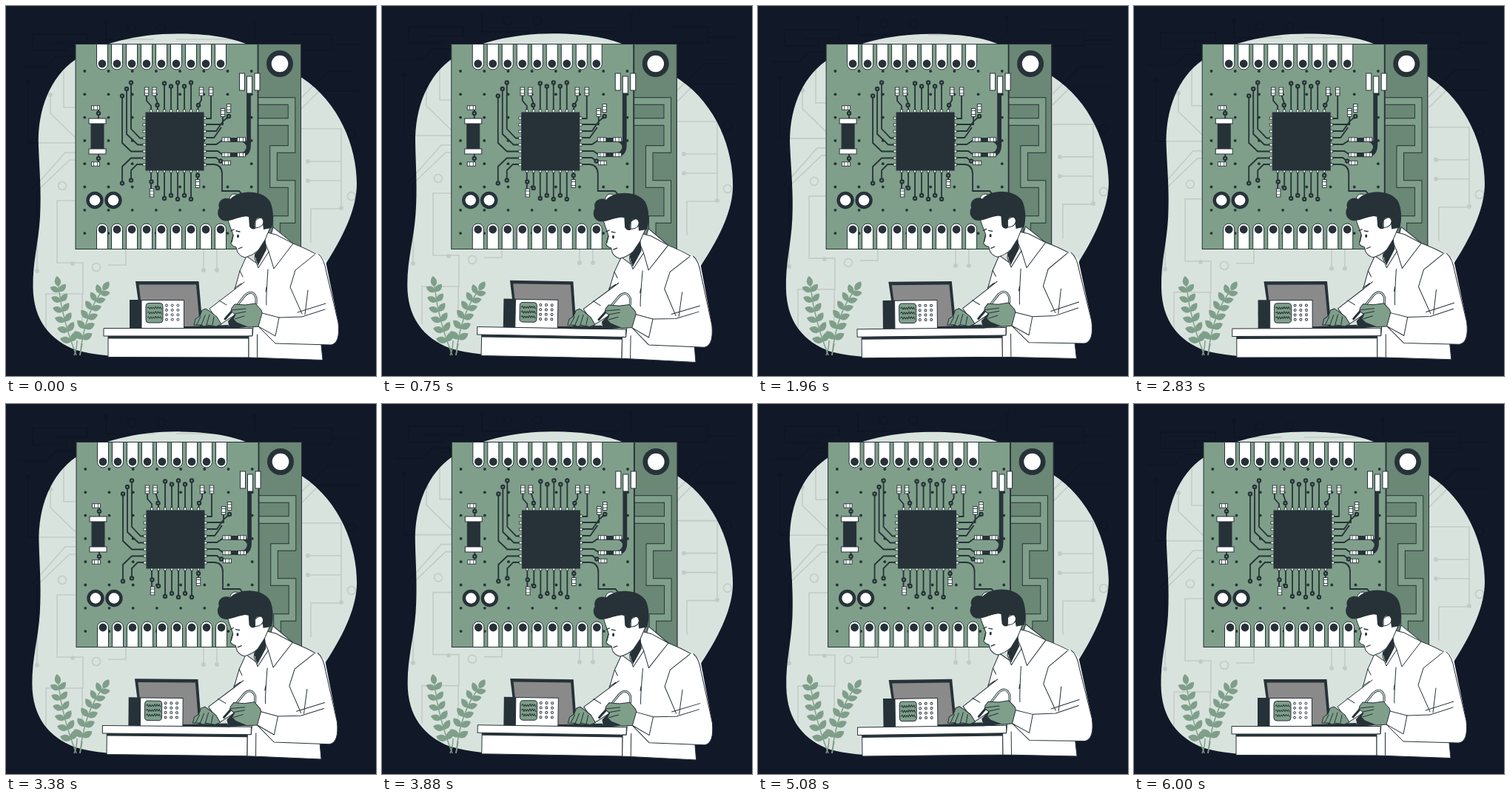
Recreate the animation shown at these times as an HTML page. Size 500 by 500 pixels, loop 6.04 s.

```html
<!DOCTYPE html>
<html lang="en">
<head>
<meta charset="utf-8">
<title>Circuit board workshop</title>
<style>
  html, body { margin: 0; width: 100%; height: 100%; overflow: hidden; background: #111827; }
  svg { display: block; width: 100vw; height: 100vh; }
  .line { fill: none; stroke: #263238; stroke-linecap: round; stroke-linejoin: round; }
  .ink { fill: #263238; }
  .shape { stroke: #263238; stroke-width: 1; stroke-linejoin: round; }
  .white { fill: #fff; }
  .green { fill: #7f9f8a; }
</style>
</head>
<body>
<svg viewBox="0 0 500 500" xmlns="http://www.w3.org/2000/svg">
  <path id="blob" fill="#d9e3de" d="M235 37.5C180 37 125 50 93 73C60 96 42 140 44 190C45 220 48 250 46 285C44 320 36 345 36.5 380C37 425 60 452 95 465C130 475 180 476 230 472C330 465 410 400 433 347C460 305 474 270 474 240C474 190 450 130 400 97C350 65 330 38 235 37.5Z"/>

  <g id="circuit" fill="none" stroke="#000" stroke-width="1.6" opacity=".1"></g>
  <g id="board"></g>
  <g id="plants" class="green"></g>

  <g id="worker">
    <!-- laptop and meter -->
    <path class="ink" d="M175 372H260.500L266 436H184Z"/>
    <path fill="#8a8a8a" d="M179.500 376.500H257L262 433H186Z"/>
    <path class="ink" d="M167 397H184V436H167Z"/>
    <path class="shape white" d="M183 397.500H240.500V436H183Z"/>
    <rect class="shape green" x="189" y="401.500" width="23" height="26.500" rx="4" stroke-width="1.4"/>
    <g id="meter"></g>

    <!-- table -->
    <path class="shape white" d="M138 446H328V475L138 474.500Z"/>
    <path class="ink" d="M138 446H328V449.500H138Z"/>
    <path class="shape white" d="M132 435.500H333V446H132Z"/>

    <!-- shirt -->
    <path class="shape white" d="M325 338L316 358L309 383L275 409L290 430L318 412L334 434L333 446H328V475L428 478.500L426 458L432 400L430 345Q424 335 388 321L361 299L355 320L342 350Z"/>
    <path class="line" d="M339.500 444V475M354 356Q351 400 352 404M309 383L322 373M316 358L320 366M318 375L309 381M288 398L298 404M352 380L351 386"/>
    <path class="ink" d="M300 426L322 403L327 434L302 436Z"/>
    <path class="ink" d="M246 433L300 431L304 436H246Z"/>

    <!-- gloves and tool -->
    <path class="shape green" d="M254 431L256 423L262 419L265 411L270 409L276 413L285 420L291 430L284 433L272 431L268 433L263 431Z"/>
    <path class="line" d="M264 431L269 418M271 431L275 417M279 431L281 420M258 430L263 420"/>
    <path class="line" d="M296 423L311 406L323 391Q333 382 338 394V402" stroke-width="3"/>
    <path class="line" d="M311 406L323 391Q333 382 338 394V402" style="stroke:#d9e3de" stroke-width="1.300"/>
    <path class="shape green" d="M305 408L309 403L323 404L337 402L345 411L347 417L344 433L327 434L312 428L307 423L310 417L304 412Z"/>
    <path class="line" d="M305 411L324 409M309 416L324 413M309 423L322 419"/>

    <!-- near arm -->
    <path class="white" d="M422 334L432 345L449 428Q452 456 439 458L364 456L341 433L346 415L369 421L398 419L384 368L390 346Z"/>
    <path class="line" d="M422 335Q430 341 433 360L449 428Q452 456 439 458L364 456L341 433L346 415L369 421L400 420L431 410M394 414L432 402M408 384L404 417M400 416L384 380L391 357L417 336M369 421L364 446L341 433"/>

    <!-- neck and collar -->
    <path class="shape white" d="M337 333L353 306L365 309L388 321L362 355L355 332L341 354L336 341Z"/>
    <path class="ink" d="M336 337L350 310L352 329L341 350Z"/>
    <path class="line" d="M355 332L350 320M341 350L338 342"/>

    <!-- head -->
    <path class="shape white" d="M300 289C302 298 306 304 307 310L304 321Q306 325 311 326L313 333Q317 339 323 340Q334 337 341 330L350 316L358 297L349 284L330 282Z"/>
    <path class="ink" d="M301 290C289 293 283 281 288 273C285 263 295 257 303 261C313 249 344 247 356 263C362 273 362 291 359 300L348 302L346 287C338 284 335 291 337 301Q332 303 329 298L328 285C319 282 310 289 301 290Z"/>
    <path class="shape white" d="M337 290Q346 282 348 291Q348 299 337 300Z"/>
    <path class="line" d="M304 304L308 302M311 304L316 305M314 328L319 326M307 310L305 319" stroke-width="1.300"/>
    <ellipse class="ink" cx="313.500" cy="311" rx="1.500" ry="2.300"/>
  </g>
</svg>

<script>
const $ = id => document.getElementById(id);
const NS = 'http://www.w3.org/2000/svg';
const INK = '#263238', GREEN = '#7f9f8a', SHADE = '#6b8775';

function add(parent, tag, attrs) {
  const el = document.createElementNS(NS, tag);
  for (const k in attrs) el.setAttribute(k, attrs[k]);
  parent.appendChild(el);
  return el;
}

function drawCircuit(g) {
  add(g, 'path', { d:
    'M35 38H110V50H60M36 38V60H82V52M18 82H55L68 68H94M78 88V137H94M60 122V145L94 178' +
    'M30 103V185H94M34 250L80 198H94M42 356V250L86 208H94M94 263H69V347H104V390M54 440V389H103V432' +
    'M162 328V350H138M267 355V328M285 355V328M410 210H453M410 236H453M398 166H453V271' +
    'M412 320V274H451M398 140L423 115H478M398 125L435 88H470M370 60H440V38H385M440 52H480' +
    'M135 24V45H200M336 22V45M230 45H320' });
  for (const [x, y] of [[60, 120], [30, 103], [42, 358], [90, 348], [267, 357], [285, 357], [408, 210],
    [408, 236], [453, 273], [135, 22], [336, 21]])
    add(g, 'circle', { cx: x, cy: y, r: 2.2, fill: '#000' });
  for (const [x, y] of [[76, 243], [122, 353], [467, 172], [467, 257], [170, 30], [210, 30]])
    add(g, 'circle', { cx: x, cy: y, r: 5.5 });
}

function drawBoard(g) {
  const box = (x, y, w, h, fill = '#fff', sw = 1) =>
    add(g, 'rect', { x, y, width: w, height: h, fill, stroke: INK, 'stroke-width': sw });
  const dot = (cx, cy, r, fill = INK) => add(g, 'circle', { cx, cy, r, fill });
  const wire = (d, width = 1.8, stroke = INK) =>
    add(g, 'path', { d, fill: 'none', stroke, 'stroke-width': width, 'stroke-linejoin': 'miter' });
  const ring = (x, y, r, hole) => { dot(x, y, r); dot(x, y, hole, '#fff'); };
  const via = (x, y) => { dot(x, y, 3.2); dot(x, y, 1, GREEN); };
  const resistor = (x, y, flat) => {
    const [w, h] = flat ? [11, 5.5] : [5.5, 11];
    box(x - w / 2, y - h / 2, w, h, '#fff', .9);
    wire(flat ? `M${x - 2.5} ${y - 2.7}v5.500m5 0v-5.500` : `M${x - 2.7} ${y - 2.5}h5.500m0 5h-5.500`, .8);
  };

  box(94, 51.5, 304.5, 277, GREEN);
  box(340.5, 51.5, 58, 277, SHADE);

  // antenna
  const antenna = 'M340.500 128.500H386V193.500H361.500V240.500H386V288.500H365.500V328M340.500 156.500H386';
  wire(antenna, 10.5);
  wire(antenna, 8.6, GREEN);
  wire('M340.500 51.500V328');

  for (let i = 0; i < 8; i++)
    for (let j = 0; j < 8; j++) dot(106.3 + i * 32.2, 88 + j * 31.3, 1.9);

  // edge pads
  for (let i = 0; i < 9; i++) {
    const x = 130 + i * 20;
    for (const [edge, s] of [[51.5, 1], [328.5, -1]]) {
      add(g, 'path', { class: 'shape white',
        d: `M${x - 7.5} ${edge}v${27 * s}a7.500 7.500 0 0 ${s > 0 ? 0 : 1} 15 0v${-27 * s}Z` });
      dot(x, edge + 26.5 * s, 5.4);
    }
  }
  ring(370, 78, 18, 11.3);
  ring(120, 262.500, 11.7, 7.2);
  ring(145, 262.500, 11.7, 7.2);

  // traces around the chip
  wire('M157 121V185L169 196.500H187M163 112V173L178 187.500H187M169 103V166L181 178.500H187' +
    'M157 239V217L169 205.500H187M169 235V222L177 214H187' +
    'M190 120V128L196 135V143M201 120L205 132V143M264 120V127L260 134L259 143M277 120V152H268' +
    'M293 149V160H268M301 149L293 156L284 169H268M291 164L281 178H268' +
    'M268 187H284L293 181M268 196H286L293 201M268 205H284L290 210H296M268 214H281Q292 215 292 227V250H315L321 257' +
    'M196 222V248M205 222V246M259 222V236M125 139V153M125 199V212');
  wire('M300 181H320M300 201H316Q328 201 328 188V116', 5.8);
  wire('M316 181Q325 182 327 190', 4);

  for (let i = 0; i < 5; i++) {
    const x = 214 + i * 9, up = [104.5, 108.5, 103.5, 108.5, 103.5][i], down = [260, 256, 261, 256, 261][i];
    wire(`M${x} ${up}V${down}`);
    via(x, up);
    via(x, down);
  }
  for (const [x, y] of [[157, 121.5], [163, 112], [169, 103.5], [157, 239.5], [169, 235.5], [204.5, 134], [260, 134],
    [301, 149], [290, 209.5], [196.5, 237.5], [205, 246], [259, 229], [125, 145], [125, 206]]) via(x, y);
  for (const [x, y] of [[190, 115.5], [200.5, 115.5], [264, 115.5], [277, 115.5], [293, 144], [301, 138],
    [197, 252.5], [259, 240]]) resistor(x, y);
  for (const [x, y] of [[121, 137.5], [121, 213.5], [297.5, 180.5], [318, 180.5], [297.5, 201], [318, 201],
    [298, 212]]) resistor(x, y, true);

  // chip
  for (let i = 0; i < 8; i++) {
    const p = 151 + i * 9, q = p + 45;
    for (const x of [185, 266.5]) box(x, p - 1, 4, 3, '#fff', .8);
    for (const y of [140, 221]) box(q - 1.5, y, 3, 4, '#fff', .8);
  }
  box(189, 144, 78, 78, INK);

  // crystal and antenna feed
  box(115, 156, 17, 40, INK);
  box(112, 152, 23, 7);
  box(112, 193, 23, 7);
  box(315.5, 91, 7, 23);
  box(325.5, 95, 7, 23);
  box(336, 91, 7, 23);

  add(g, 'circle', { class: 'shape white', cx: 309, cy: 261, r: 7 });
}

// Stem as a quadratic curve with leaf pairs leaning away from it.
function drawPlant(g, [x0, y0], [cx, cy], [x1, y1]) {
  add(g, 'path', { d: `M${x0} ${y0}Q${cx} ${cy} ${x1} ${y1}`, fill: 'none', stroke: GREEN, 'stroke-width': 1.5 });
  const leaf = (x, y, a, s) => add(g, 'path', {
    d: 'M0 0C3-6 10-6 15-1C11 5 4 6 0 0Z', transform: `translate(${x} ${y}) rotate(${a}) scale(${s})` });
  const mix = (a, b, c, t) => (1 - t) ** 2 * a + 2 * t * (1 - t) * b + t * t * c;
  for (let i = 0; i < 6; i++) {
    const t = .2 + i * .145;
    const x = mix(x0, cx, x1, t), y = mix(y0, cy, y1, t);
    const dx = (1 - t) * (cx - x0) + t * (x1 - cx), dy = (1 - t) * (cy - y0) + t * (y1 - cy);
    const a = Math.atan2(dy, dx) * 180 / Math.PI;
    leaf(x, y, a - 53, 1.02 - i * .025);
    leaf(x, y, a + 53, 1.02 - i * .025);
  }
  leaf(x1, y1, Math.atan2(y1 - cy, x1 - cx) * 180 / Math.PI, .95);
}

function drawMeter(g) {
  for (let r = 0; r < 3; r++) {
    let d = `M191 ${408 + r * 6.5}`;
    for (let i = 1; i <= 12; i++) d += `L${191 + i * 1.6} ${408 + r * 6.5 + (i % 2 ? -1.8 : 1.6) * (.6 + (i * 7 % 5) / 8)}`;
    add(g, 'path', { class: 'line', d, 'stroke-width': 1 });
  }
  for (let i = 0; i < 12; i++)
    add(g, 'circle', { class: 'shape white', cx: 217 + i % 3 * 7.7, cy: 404.5 + Math.floor(i / 3) * 6.4, r: 1.5 });
}

drawCircuit($('circuit'));
drawBoard($('board'));
drawPlant($('plants'), [95, 472], [76, 425], [71, 379]);
drawPlant($('plants'), [100, 472], [106, 415], [131, 384]);
add($('plants'), 'path', { d: 'M92 472Q96 463 96 452M100 472L103 456', fill: 'none', stroke: GREEN, 'stroke-width': 1.5 });
drawMeter($('meter'));

// Each track: period in ms and [phase, value] steps, linear between them.
const WIND = [3000, [[0, 0], [.25, 1], [.75, -1], [1, 0]]];
const FLOAT = [1500, [[0, 0], [.5, -10], [1, 0]]];
const SHAKE = [6000, [[0, 0], [.1, -1], [.2, 2], [.3, -4], [.4, 4], [.5, -4], [.6, 4], [.7, -4], [.8, 2], [.9, -1], [1, 0]]];

function value([period, steps], t) {
  const p = t % period / period;
  const i = steps.findIndex(s => s[0] > p);
  const [a, u] = steps[i - 1], [b, v] = steps[i];
  return u + (v - u) * (p - a) / (b - a);
}

const LOOP = 6040, FPS = 24;
const start = performance.now();

function draw() {
  const t = Math.max(0, performance.now() - start) % LOOP;
  const tick = Math.floor((t + 5) * FPS / 1000) * 1000 / FPS;
  const turn = `rotate(${value(WIND, tick)} 250 250)`;
  $('blob').setAttribute('transform', turn);
  $('worker').setAttribute('transform', turn);
  $('circuit').setAttribute('transform', `translate(0 ${value(FLOAT, tick)})`);
  $('board').setAttribute('transform', `translate(${value(SHAKE, tick)} 0)`);
  requestAnimationFrame(draw);
}
draw();
</script>
</body>
</html>
```
